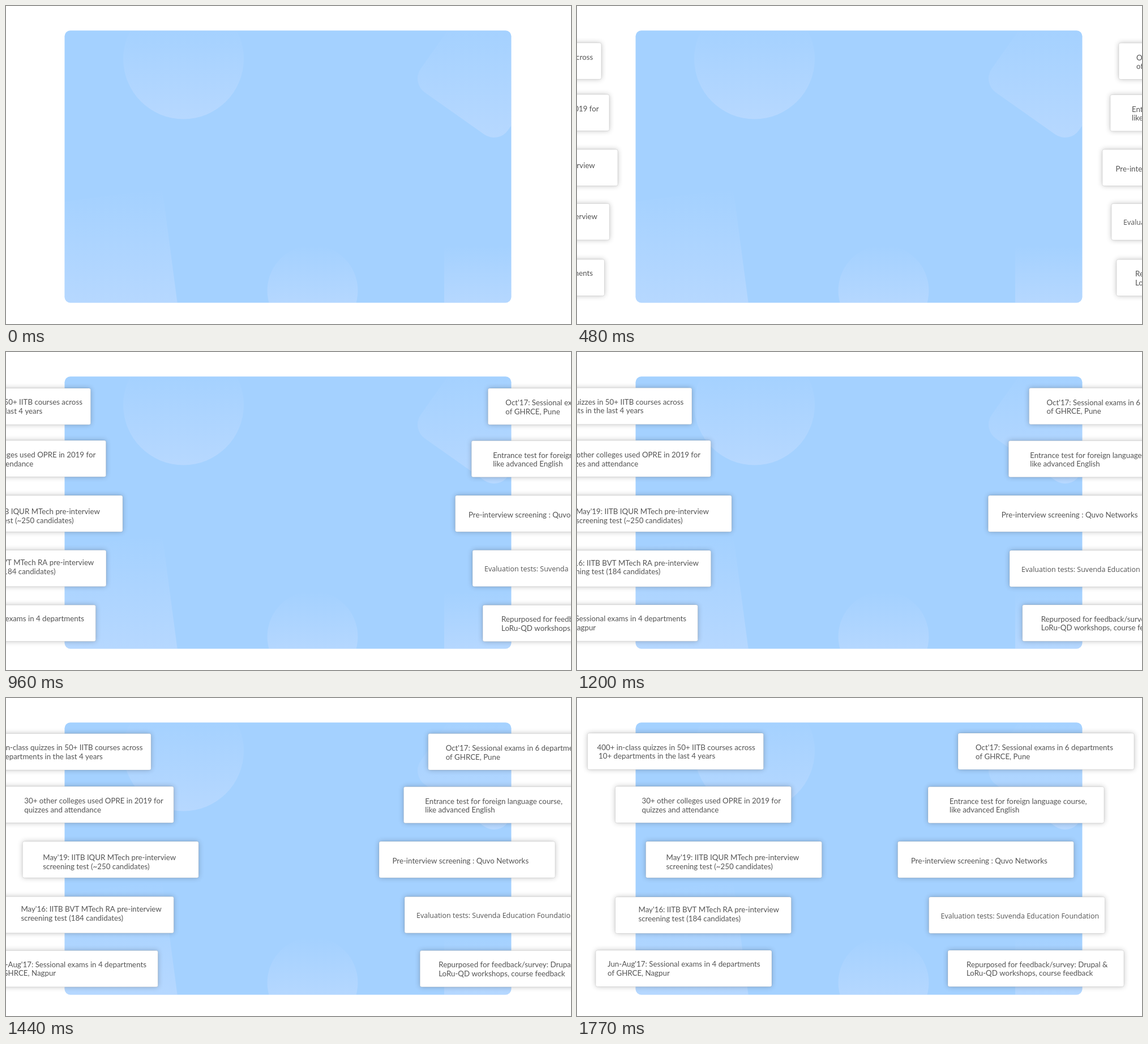
An HTML page with a canvas that plays this animation: 998 by 561 pixels, repeating every 1800 ms.

```html
<!DOCTYPE html>
<html lang="en">
<head>
<meta charset="utf-8">
<style>
  html, body { margin: 0; width: 100%; height: 100%; overflow: hidden; background: #fff; }
  canvas { display: block; }
</style>
</head>
<body>
<canvas id="stage" width="998" height="561"></canvas>
<script>
const ctx = document.getElementById('stage').getContext('2d');
const LOOP = 1800, STEP = 30, START = 240, END = 1770, TRAVEL = 1290;
const BODY = '13.3px Lato, sans-serif', ALT = '12.5px "Open Sans", sans-serif';

// x, y: resting corner; dx, dy: offset one TRAVEL earlier; tx, ty: first baseline inside the card
const card = (x, y, dx, dy, tx, ty, lines, indent = 0, font = BODY) =>
  ({ x, y, dx, dy, tx, ty, lines, indent, font });

const cards = [
  card(18.5, 62, -286.5, 3, 17, 29.5, ['400+ in-class quizzes in 50+ IITB courses across', '10+ departments in the last 4 years'], 2.5),
  card(67.5, 156, -321.5, 0, 47, 30, ['30+ other colleges used OPRE in 2019 for', 'quizzes and attendance']),
  card(121.5, 253, -360.5, 0, 36, 33, ["May'19: IITB IQUR MTech pre-interview", 'screening test (~250 candidates)']),
  card(67.5, 351, -321, -2.5, 41, 27, ["May'16: IITB BVT MTech RA pre-interview", 'screening test (184 candidates)']),
  card(33, 445, -295.5, 2, 21, 29.2, ["Jun-Aug'17: Sessional exams in 4 departments", 'of GHRCE, Nagpur']),
  card(673, 62, 284, 3.2, 31, 30.3, ["Oct'17: Sessional exams in 6 departments", 'of GHRCE, Pune']),
  card(620, 156.5, 322, 0, 38, 30, ['Entrance test for foreign language course,', 'like advanced English']),
  card(566.5, 253, 361.5, 0, 23.5, 38.5, ['Pre-interview screening : Quvo Networks']),
  card(621.5, 351, 322.5, -2.3, 21, 37.7, ['Evaluation tests: Suvenda Education Foundation'], 0, ALT),
  card(655, 445, 298, 2.2, 33, 29.7, ['Repurposed for feedback/survey: Drupal &', 'LoRu-QD workshops, course feedback'])
];

function fade(top, bottom, trace) {
  const gradient = ctx.createLinearGradient(0, top, 0, bottom);
  gradient.addColorStop(0, 'rgba(225,232,255,0)');
  gradient.addColorStop(1, 'rgba(225,232,255,.3)');
  ctx.beginPath();
  ctx.save();
  trace();
  ctx.restore();
  ctx.fillStyle = gradient;
  ctx.fill();
}

function drawPanel() {
  ctx.save();
  ctx.beginPath();
  ctx.roundRect(103.5, 43.3, 789, 480.2, 10);
  ctx.fillStyle = '#a4d1ff';
  ctx.fill();
  ctx.clip();
  fade(34, 199, () => ctx.arc(313.5, 93, 106.5, 0, 7));
  fade(422, 535, () => ctx.arc(541.5, 502, 80, 0, 7));
  fade(34, 232, () => {
    ctx.translate(757, 128);
    ctx.rotate(0.614);
    ctx.roundRect(-30, -158.5, 188.5, 188.5, 30);
  });
  fade(322, 530, () => {
    ctx.moveTo(103, 345);
    ctx.lineTo(276, 322);
    ctx.lineTo(302.7, 524);
    ctx.lineTo(103, 524);
  });
  fade(422, 530, () => ctx.rect(774, 420, 120, 105));
  ctx.restore();
}

function drawCard(c, back) {
  ctx.save();
  ctx.translate(c.x + c.dx * back, c.y + c.dy * back);
  ctx.beginPath();
  ctx.roundRect(0, 0, 311, 64.3, 3);
  ctx.save();
  ctx.shadowColor = 'rgba(0,0,0,.24)';
  ctx.shadowBlur = 10;
  ctx.fillStyle = '#fff';
  ctx.fill();
  ctx.restore();
  ctx.strokeStyle = 'rgba(0,0,0,.1)';
  ctx.stroke();
  ctx.fillStyle = '#545454';
  ctx.font = c.font;
  c.lines.forEach((line, i) => ctx.fillText(line, c.tx + i * c.indent, c.ty + i * 15.6));
  ctx.restore();
}

function frame() {
  const t = Math.floor(performance.now() % LOOP / STEP) * STEP;
  ctx.clearRect(0, 0, 998, 561);
  drawPanel();
  if (t >= START) cards.forEach(c => drawCard(c, (END - t) / TRAVEL));
  requestAnimationFrame(frame);
}
frame();
</script>
</body>
</html>
```
